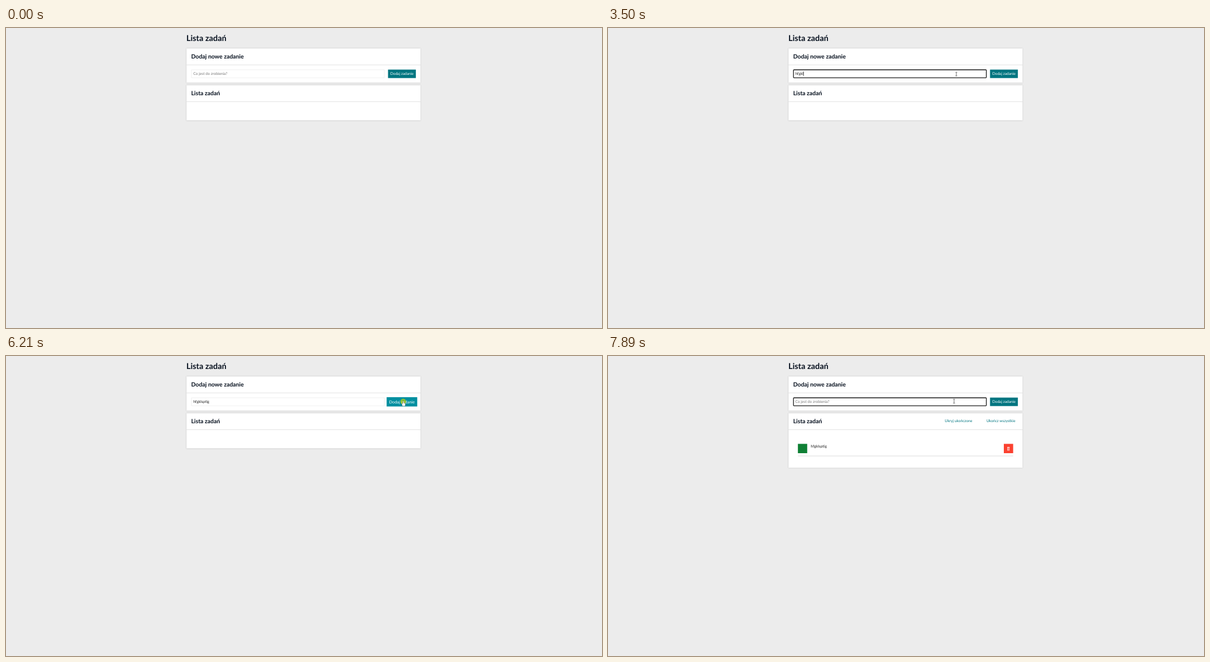
An HTML page with a canvas for the animation above (8 s loop, 1054x531 px).

```html
<!DOCTYPE html>
<html lang="pl">
<head>
<meta charset="utf-8">
<title>Lista zadań</title>
<style>
html, body { margin: 0; width: 100%; height: 100%; overflow: hidden; background: #ececec; }
canvas { display: block; }
</style>
</head>
<body>
<canvas id="stage" width="1054" height="531"></canvas>
<script>
const ctx = document.getElementById('stage').getContext('2d');
const LOOP = 8000;
const ZOOM = 0.414; // page zoom: text sizes are in CSS pixels
const LEFT = 319.2, WIDTH = 413.8;
const INK = '#07111f', TEAL = '#007580';

const TASK = 'hfgklsptig';
const FOCUS = 1300, PRESS = 6140, SUBMIT = 6280, RELEASE = 6350;
const HOVER_IN = 5650, HOVER_OUT = 6670, HOVER_TIME = 500;
const BLINK = 530, POINTER_STEP = 66;

const lerp = (a, b, u) => a + (b - a) * u;
const clamp = u => Math.max(0, Math.min(1, u));
const easeOut = u => u * (2 - u);
const easeInOut = u => u ** 3 * (10 - 15 * u + 6 * u * u);

// The pointer sweeps along arcs, each from one point via a control point to another.
const home = [616, 81.5], submit = [702.5, 80], rest = [629, 48];
const moves = [
  { start: 690, time: 396, from: [878, 0], via: [690, 80], to: home, ease: easeOut },
  { start: 5030, time: 760, from: home, via: [628, 8], to: submit, ease: easeInOut },
  { start: 6610, time: 530, from: submit, via: [692, 46], to: rest, ease: easeOut },
  { start: 7340, time: 330, from: rest, via: [616, 66], to: [612, 80], ease: easeOut }
];

function pointerAt(t) {
  const move = moves.findLast(m => t >= m.start);
  if (!move) return null;
  const { start, time, from, via, to } = move;
  const held = Math.floor((t - start) / POINTER_STEP) * POINTER_STEP;
  const u = move.ease(clamp(held / time));
  const [x, y] = [0, 1].map(i => lerp(lerp(from[i], via[i], u), lerp(via[i], to[i], u), u));
  return { x, y };
}

// A quick burst of four keys, then a second one that slows down.
const keyTime = i => i < 4 ? 2640 + 110 * i : 3500 + 90 * (i - 4) ** 1.5;

function setFont(size, weight = 400) {
  ctx.font = `${weight} ${size}px Lato, sans-serif`;
  ctx.textRendering = 'geometricPrecision';
}

function text(str, x, y, color, size = 16, weight = 400) {
  ctx.save();
  ctx.translate(x, y);
  ctx.scale(ZOOM, ZOOM);
  setFont(size, weight);
  ctx.fillStyle = color;
  ctx.fillText(str, 0, 0);
  ctx.restore();
}

function textWidth(str) {
  setFont(16);
  return ctx.measureText(str).width * ZOOM;
}

function rect(x, y, w, h, color) {
  ctx.fillStyle = color;
  ctx.fillRect(x, y, w, h);
}

function card(top, height, title) {
  ctx.save();
  ctx.shadowColor = '#c4c4c4';
  ctx.shadowBlur = 2;
  rect(LEFT, top, WIDTH, height, '#fff');
  ctx.restore();
  rect(LEFT, top + 28.6, WIDTH, 0.9, '#dedede');
  text(title, LEFT + 8.2, top + 17.5, INK, 25, 700);
}

function field(t) {
  const focused = (t >= FOCUS && t < PRESS) || t >= SUBMIT;
  let typed = 0;
  while (t < SUBMIT && typed < TASK.length && t >= keyTime(typed)) typed++;
  const value = TASK.slice(0, typed);

  ctx.beginPath();
  ctx.roundRect(328, 74, 341.1, 14.1, focused ? 1 : 0);
  ctx.lineWidth = focused ? 1.3 : 0.6;
  ctx.strokeStyle = focused ? '#161616' : '#e4e4e4';
  ctx.stroke();
  if (value) text(value, 331.2, 83.3, '#222');
  else text('Co jest do zrobienia?', 331.2, 83.3, '#757575');

  const since = t >= SUBMIT ? SUBMIT : typed ? keyTime(typed - 1) : FOCUS;
  const lit = Math.floor((t - since) / BLINK) % 2 === 0;
  if (focused && lit) rect(331.2 + textWidth(value), 77, 0.7, 8, '#000');
}

function button(t) {
  const shift = start => easeOut(clamp((t - start) / HOVER_TIME));
  const hover = shift(HOVER_IN) - shift(HOVER_OUT);
  const size = 1 + hover * 0.1;
  const label = 'Dodaj zadanie';
  ctx.save();
  ctx.translate(700.2, 81.1);
  ctx.scale(size, size);
  rect(-24.6, -7.5, 49.2, 15, `rgb(0, ${lerp(117, 143, hover)}, ${lerp(128, 160, hover)})`);
  text(label, -textWidth(label) / 2, 2.2, '#fff');
  ctx.restore();
}

function bin(x, y) {
  ctx.strokeStyle = '#fff';
  ctx.lineWidth = 0.6;
  ctx.strokeRect(x - 1.6, y - 2.2, 3.2, 5.2);
  rect(x - 2.1, y - 3, 4.2, 0.8, '#fff');
  for (const side of [-1, 1]) rect(x + side * 0.7 - 0.25, y - 1.8, 0.5, 4.4, '#fff');
}

function tasks() {
  text('Ukryj ukończone', 595.6, 117.3, TEAL);
  text('Ukończ wszystkie', 669.2, 117.3, TEAL);
  rect(335.8, 155.5, 16.5, 16.5, '#0f8035');
  text(TASK, 358.5, 161.6, '#222');
  rect(700, 155.5, 16.5, 16.5, '#fb4130');
  bin(708.2, 164);
  rect(335.8, 176.5, 380.7, 0.9, '#d8d8d8');
}

function outline(path) {
  ctx.lineWidth = 0.7;
  ctx.strokeStyle = '#333';
  ctx.stroke(path);
  ctx.fillStyle = '#fff';
  ctx.fill(path);
}

function iBeam(x, y) {
  rect(x - 0.4, y - 3.5, 0.8, 7, '#444');
  for (const side of [-1, 1]) rect(x - 1.7, y + side * 3.4 - 0.35, 3.4, 0.7, '#555');
}

function arrow(x, y) {
  outline(new Path2D(`M${x} ${y} v7 l1.6 -1.4 l1.1 2.4 l1.1 -.5 l-1 -2.3 h2.1 z`));
}

function hand(x, y) {
  const path = new Path2D();
  path.roundRect(x - 0.6, y, 1.3, 5, 0.6);
  path.roundRect(x - 2, y + 3.4, 5.6, 5, 1.5);
  outline(path);
}

function pointer(t) {
  const p = pointerAt(t);
  if (!p) return;
  const over = (l, r) => p.x > l && p.x < r && p.y > 73.5 && p.y < 88.7;
  if ((t >= FOCUS && t < FOCUS + 70) || (t >= PRESS && t < RELEASE)) {
    ctx.beginPath();
    ctx.arc(p.x, p.y + 0.6, 5, 0, Math.PI * 2);
    ctx.fillStyle = 'rgba(205, 215, 0, 0.65)';
    ctx.fill();
  }
  if (over(327, 669.5)) iBeam(p.x, p.y);
  else if (over(675, 725.5)) hand(p.x, p.y);
  else arrow(p.x, p.y);
}

function draw(t) {
  const added = t >= SUBMIT;
  rect(0, 0, 1054, 531, '#ececec');
  text('Lista zadań', LEFT - 0.2, 23, INK, 34.6, 700);
  card(36.2, 60.5, 'Dodaj nowe zadanie');
  card(101.3, added ? 96.5 : 62.2, 'Lista zadań');
  field(t);
  button(t);
  if (added) tasks();
  pointer(t);
}

const begin = performance.now();
function tick() {
  draw((performance.now() - begin) % LOOP);
  requestAnimationFrame(tick);
}
tick();
</script>
</body>
</html>
```
